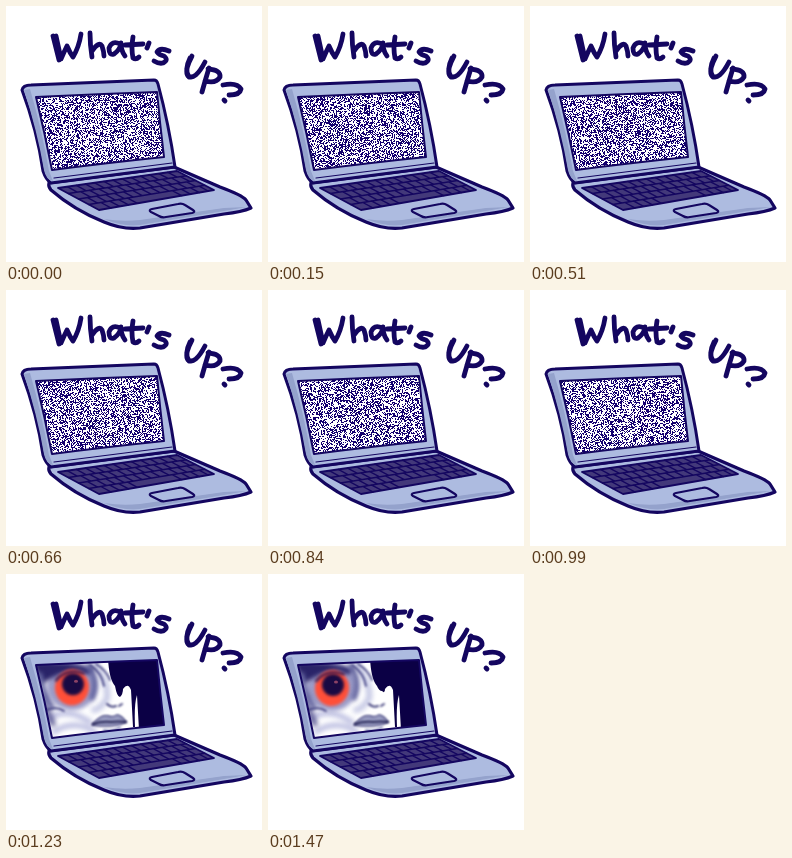
An HTML page with a canvas that plays this animation: 256 by 256 pixels, repeating every 1.5 s.

```html
<!DOCTYPE html>
<html>
<head>
<meta charset="utf-8">
<style>
html, body { margin: 0; width: 100%; height: 100%; overflow: hidden; background: #fff; }
canvas { display: block; width: 256px; height: 256px; }
</style>
</head>
<body>
<canvas id="stage" width="256" height="256"></canvas>
<script>
const ctx = document.getElementById('stage').getContext('2d');
const INK = '#140660', NAVY = '#0b0045', BODY = '#adbbe0', EDGE = '#94a2cc', RED = '#ff4f38';
const STEP = 30, LOOP = 1500, FACE_START = 1110;
const SCREEN = new Path2D('M30 91 Q92 88 151 86 Q154 118 158 151 Q100 157 46 164 Q39 128 30 91Z');

const LETTERS = [
  'M47 30 L53 54 M50 30 L55 53 Q58 46 61 40 Q64 47 67 51 Q73 41 75 28',
  'M84 27 Q84 39 86 51 M86 45 Q93 35 96 40 Q98 46 98 50',
  'M114 38 Q106 34 103 42 Q103 50 108 48 Q114 44 115 37 Q115 45 119 50',
  'M127 31 Q125 42 127 52 Q130 54 133 51 M119 39 L137 38',
  'M143 37 L141 42',
  'M163 45 Q154 41 151 46 Q153 49 158 50 Q163 54 157 57 Q153 58 148 55',
  'M186 50 Q178 65 182 70 Q189 75 199 56 M184 52 Q178 64 183 71',
  'M203 62 Q199 75 196 86 M202 63 Q215 64 214 71 Q210 78 199 75',
  'M217 79 Q231 76 235 83 Q234 89 223 89 M218 94 L219 95'
].map(d => new Path2D(d));

function shape(d, fill, stroke, width = 2.5) {
  const p = new Path2D(d);
  if (fill) { ctx.fillStyle = fill; ctx.fill(p); }
  if (stroke) { ctx.strokeStyle = stroke; ctx.lineWidth = width; ctx.stroke(p); }
}

function oval(x, y, rx, ry, fill, angle = 0) {
  ctx.beginPath();
  ctx.ellipse(x, y, rx, ry, angle, 0, 7);
  ctx.fillStyle = fill;
  ctx.fill();
}

function soft(radius, draw) {
  ctx.save();
  ctx.filter = `blur(${radius}px)`;
  draw();
  ctx.restore();
}

function random(seed) {
  let s = (seed * 2654435761 + 97531) >>> 0;
  return () => {
    s = (s + 0x6d2b79f5) >>> 0;
    let t = Math.imul(s ^ (s >>> 15), s | 1);
    t ^= t + Math.imul(t ^ (t >>> 7), t | 61);
    return ((t ^ (t >>> 14)) >>> 0) / 4294967296;
  };
}

function lettering() {
  ctx.strokeStyle = INK;
  ctx.lineWidth = 4.8;
  for (const p of LETTERS) ctx.stroke(p);
}

function keyboard() {
  const corners = [[52, 182], [171, 165], [208, 184], [93, 204]];
  const at = (u, v) => [0, 1].map(i =>
    (1 - v) * ((1 - u) * corners[0][i] + u * corners[1][i]) +
    v * ((1 - u) * corners[3][i] + u * corners[2][i]));
  const line = (a, b) => { ctx.moveTo(...a); ctx.lineTo(...b); };
  shape('M52 182 L171 165 L208 184 L93 204Z', '#43397a', INK, 1.8);
  ctx.beginPath();
  for (let row = 1; row < 4; row++) line(at(0, row / 4), at(1, row / 4));
  for (let row = 0; row < 4; row++)
    for (let col = 1; col < 13; col++) {
      const u = (col + (row % 2) * 0.35) / 13;
      if (row === 3 && col > 4 && col < 9) continue;
      line(at(u, row / 4), at(u, (row + 1) / 4));
    }
  ctx.strokeStyle = INK;
  ctx.lineWidth = 1.4;
  ctx.stroke();
}

function laptop() {
  shape('M43 177 L168 161 L214 181 Q236 189 240 194 L245 202 Q236 206 218 208 L134 222 Q117 224 98 216 Q68 204 45 184 Q42 181 43 177Z', BODY, INK, 3.2);
  shape('M98 213 Q117 221 134 219 L218 205 L241 201 L218 202 L134 214 Q116 216 98 213Z', EDGE);
  shape('M16 84 Q17 79 25 79 L148 74 Q151 74 152 78 Q163 119 169 161 L45 177 Q40 174 37 165 Q31 124 16 84Z', BODY, INK, 3);
  shape('M18 84 L24 83 Q36 124 43 165 L47 175 Q40 174 38 164 Q31 124 18 84Z', EDGE);
  shape('M48 172 L166 157', null, INK, 1.2);
  keyboard();
  shape('M146 203 L172 198 Q176 197 179 199 L187 204 Q190 206 186 207 L160 211 Q156 212 153 210 L145 206 Q142 204 146 203Z', BODY, INK, 2.2);
}

const noise = document.createElement('canvas');
noise.width = 130;
noise.height = 80;
const noiseCtx = noise.getContext('2d');

function staticNoise(step) {
  const rnd = random(step + 1);
  const img = noiseCtx.createImageData(noise.width, noise.height);
  for (let i = 0; i < img.data.length; i += 4) {
    const dark = rnd() < 0.45;
    img.data[i] = dark ? 20 : 255;
    img.data[i + 1] = dark ? 0 : 255;
    img.data[i + 2] = dark ? 110 : 255;
    img.data[i + 3] = 255;
  }
  noiseCtx.putImageData(img, 0, 0);
  ctx.drawImage(noise, 29, 86);
}

function eye(x, y) {
  soft(2.2, () => {
    oval(x, y, 25, 24, '#9c9cc8');
    shape(`M26 88 Q${x - 8} 86 ${x + 22} 95 L${x + 17} 101 Q${x} 89 36 110Z`, '#292368');
    shape('M34 101 Q38 122 46 133 M82 92 Q93 107 86 124', null, '#5d5f9c', 5);
  });
  soft(1.5, () => {
    oval(x, y + 1, 17, 18, RED, 0.2);
    oval(x + 1, y - 2, 11, 11, '#190a43');
    shape(`M${x - 16} ${y - 6} Q${x - 6} ${y - 18} ${x + 12} ${y - 13}`, null, '#2b1450', 2.5);
  });
  soft(0.7, () => oval(x + 4, y - 5, 2, 1.5, '#8b4265'));
}

function face(p) {
  const wobble = Math.sin(p * Math.PI * 6);
  ctx.fillStyle = '#fff';
  ctx.fillRect(28, 84, 132, 84);
  soft(2.5, () => {
    shape('M43 145 Q60 132 84 148 M48 158 Q66 145 88 157', null, '#b8badf', 5);
    shape('M88 91 Q103 108 101 125 Q93 136 88 136', null, '#c4c7e4', 6);
    shape('M37 122 Q42 139 47 150', null, '#53518e', 5);
  });
  eye(67 - 3 * p, 112 + p);
  soft(0.8, () => {
    shape('M84 91 Q96 99 98 112 M90 90 Q100 96 104 106 M40 136 Q51 132 58 137', null, '#3c3b7f', 1.7);
    shape('M101 130 Q105 134 110 132 M113 132 L116 130', null, '#45447f', 2);
    shape('M86 151 Q95 140 102 142 Q107 144 111 141 Q116 142 120 148 Q108 154 86 151Z', '#9da1c5', '#4b4a84', 1.4);
    shape('M87 150 Q96 147 105 148 Q113 147 120 148', null, '#222052', 2.2);
    shape('M98 156 Q107 158 114 153', null, '#8085b4', 2);
  });
  const drip = 126 - 9 * p + wobble;
  soft(0.6, () => {
    shape(`M102 84 Q103 105 109 112 Q111 ${drip} 114 ${drip} Q117 120 117 115 Q122 108 125 116 L127 153 L129 153 Q128 130 131 121 L133 156 L162 156 L156 82Z`, NAVY);
  });
}

function render(now) {
  const step = Math.floor((now % LOOP) / STEP);
  const time = step * STEP;
  ctx.fillStyle = '#fff';
  ctx.fillRect(0, 0, 256, 256);
  ctx.lineCap = ctx.lineJoin = 'round';
  lettering();
  laptop();
  ctx.save();
  ctx.clip(SCREEN);
  if (time < FACE_START) staticNoise(step);
  else face((time - FACE_START) / (LOOP - STEP - FACE_START));
  ctx.restore();
  ctx.strokeStyle = INK;
  ctx.lineWidth = 2;
  ctx.stroke(SCREEN);
}

let start;
function tick(now) {
  start ??= now;
  render(now - start);
  requestAnimationFrame(tick);
}
render(0);
requestAnimationFrame(tick);
</script>
</body>
</html>
```
